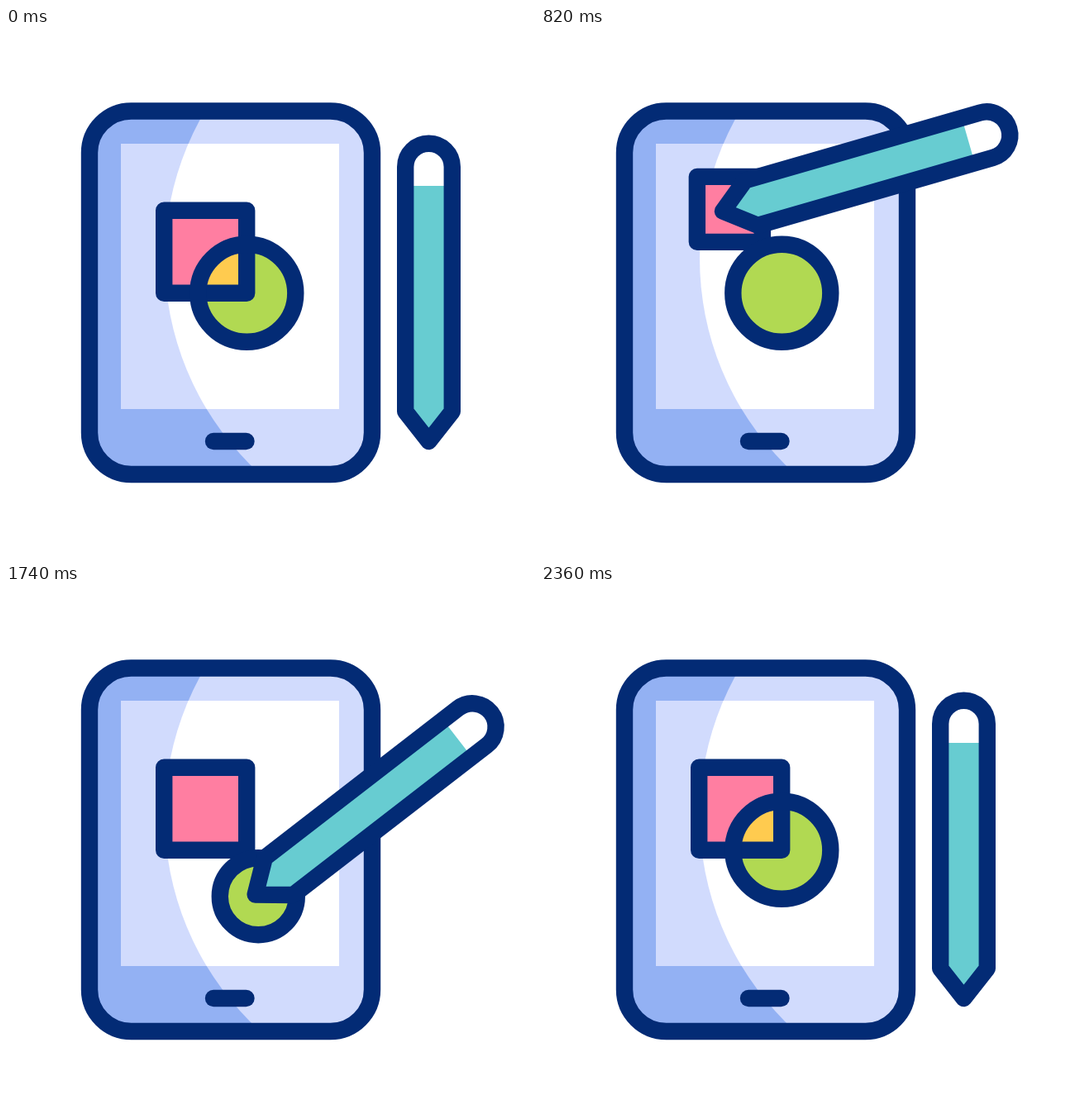
An HTML page with a canvas for the animation above (2400 ms loop, 640 by 640 pixels).

```html
<!DOCTYPE html>
<html>
<head>
<meta charset="utf-8">
<style>
  html, body { margin: 0; width: 100%; height: 100%; overflow: hidden; background: #fff; }
  canvas { display: block; }
</style>
</head>
<body>
<canvas id="stage" width="640" height="640"></canvas>
<script>
const ctx = document.getElementById('stage').getContext('2d');
const LOOP = 2400;
const NAVY = '#032b75', BLUE = '#93b1f3', PALE = '#d1dbfd', TEAL = '#67ccd1';
const PINK = '#ff7ea1', GREEN = '#b1d952', ORANGE = '#ffcb4f';

// Each row: time, then values
const penKeys = [ // tip x, tip y, angle
  [200, 511.5, 500, 0],
  [580, 245, 288, 51.2],
  [640, 236, 273, 55],
  [890, 218, 214, 77],
  [1060, 228, 256, 63.6],
  [1190, 237, 272, 55],
  [1280, 254, 286, 54],
  [1420, 280.5, 315.5, 52.4],
  [1500, 286, 320, 52.3],
  [1740, 301.6, 374.5, 52.3],
  [1800, 303, 379, 52.3],
  [2060, 290, 325, 52],
  [2140, 305.7, 344.8, 47.5],
  [2240, 410, 425, 25],
  [2360, 511.5, 500, 0]
];
const squareSize = [[460, 100], [610, 79], [1090, 79], [1200, 100]];
const squareDrag = [[600, 0], [890, 1], [1060, .333], [1180, 0]];
const circleSize = [[1385, 59], [1420, 57.5], [1520, 46.5], [2030, 46.5], [2120, 59]];
const circleDrag = [[1500, 0], [1740, .93], [1800, 1], [2080, 0]];

// Monotone cubic interpolation: smooth, and at rest on every turning point
function track(keys, t, col = 1) {
  const last = keys.length - 1;
  if (t <= keys[0][0]) return keys[0][col];
  if (t >= keys[last][0]) return keys[last][col];
  const slope = i => (keys[i + 1][col] - keys[i][col]) / (keys[i + 1][0] - keys[i][0]);
  const tangent = i => {
    if (i === 0 || i === last) return 0;
    const a = slope(i - 1), b = slope(i);
    return a * b > 0 ? 2 * a * b / (a + b) : 0;
  };
  const i = keys.findIndex(k => k[0] > t) - 1;
  const [t0, t1] = [keys[i][0], keys[i + 1][0]];
  const h = t1 - t0, u = (t - t0) / h, e = u * u * (3 - 2 * u);
  return keys[i][col] * (1 - e) + keys[i + 1][col] * e
    + h * u * (1 - u) * (tangent(i) * (1 - u) - tangent(i + 1) * u);
}

function fill(path, color) {
  ctx.fillStyle = color;
  ctx.fill(path);
}

function clipped(path, draw) {
  ctx.save();
  ctx.clip(path);
  draw();
  ctx.restore();
}

function rect(x, y, w, h, r = 0) {
  const p = new Path2D();
  p.roundRect(x, y, w, h, r);
  return p;
}

function disc(x, y, r) {
  const p = new Path2D();
  p.arc(x, y, r, 0, Math.PI * 2);
  return p;
}

const body = rect(101, 100.5, 342, 439.5, 50.5);
const screen = rect(139, 140, 264, 321);
const shine = disc(544, 279, 352);
const button = new Path2D('M251 500H290.5');
const pen = new Path2D('M0 0L-28.3 -36V-332A28.3 28.3 0 0 1 28.3 -332V-36Z');
const penPaint = rect(-28.3, -309, 56.6, 309);

function drawTablet() {
  fill(body, BLUE);
  clipped(body, () => fill(shine, PALE));
  fill(screen, PALE);
  clipped(screen, () => fill(shine, '#fff'));
  ctx.stroke(body);
  ctx.stroke(button);
}

function drawShapes(t) {
  const size = track(squareSize, t), up = track(squareDrag, t), down = track(circleDrag, t);
  const square = rect(241.2 - 15 * up - size / 2, 270.8 - 60 * up - size / 2, size, size);
  const circle = disc(291.3 + 15 * down, 320.8 + 60 * down, track(circleSize, t));
  fill(square, PINK);
  fill(circle, GREEN);
  clipped(square, () => fill(circle, ORANGE));
  ctx.stroke(square);
  ctx.stroke(circle);
}

function drawPen(t) {
  ctx.save();
  ctx.translate(track(penKeys, t, 1), track(penKeys, t, 2));
  ctx.rotate(track(penKeys, t, 3) * Math.PI / 180);
  fill(pen, '#fff');
  clipped(pen, () => fill(penPaint, TEAL));
  ctx.stroke(pen);
  ctx.restore();
}

function frame() {
  const t = performance.now() % LOOP;
  ctx.fillStyle = '#fff';
  ctx.fillRect(0, 0, 640, 640);
  ctx.strokeStyle = NAVY;
  ctx.lineWidth = 20.4;
  ctx.lineJoin = ctx.lineCap = 'round';
  drawTablet();
  drawShapes(t);
  drawPen(t);
  requestAnimationFrame(frame);
}
frame();
</script>
</body>
</html>
```
